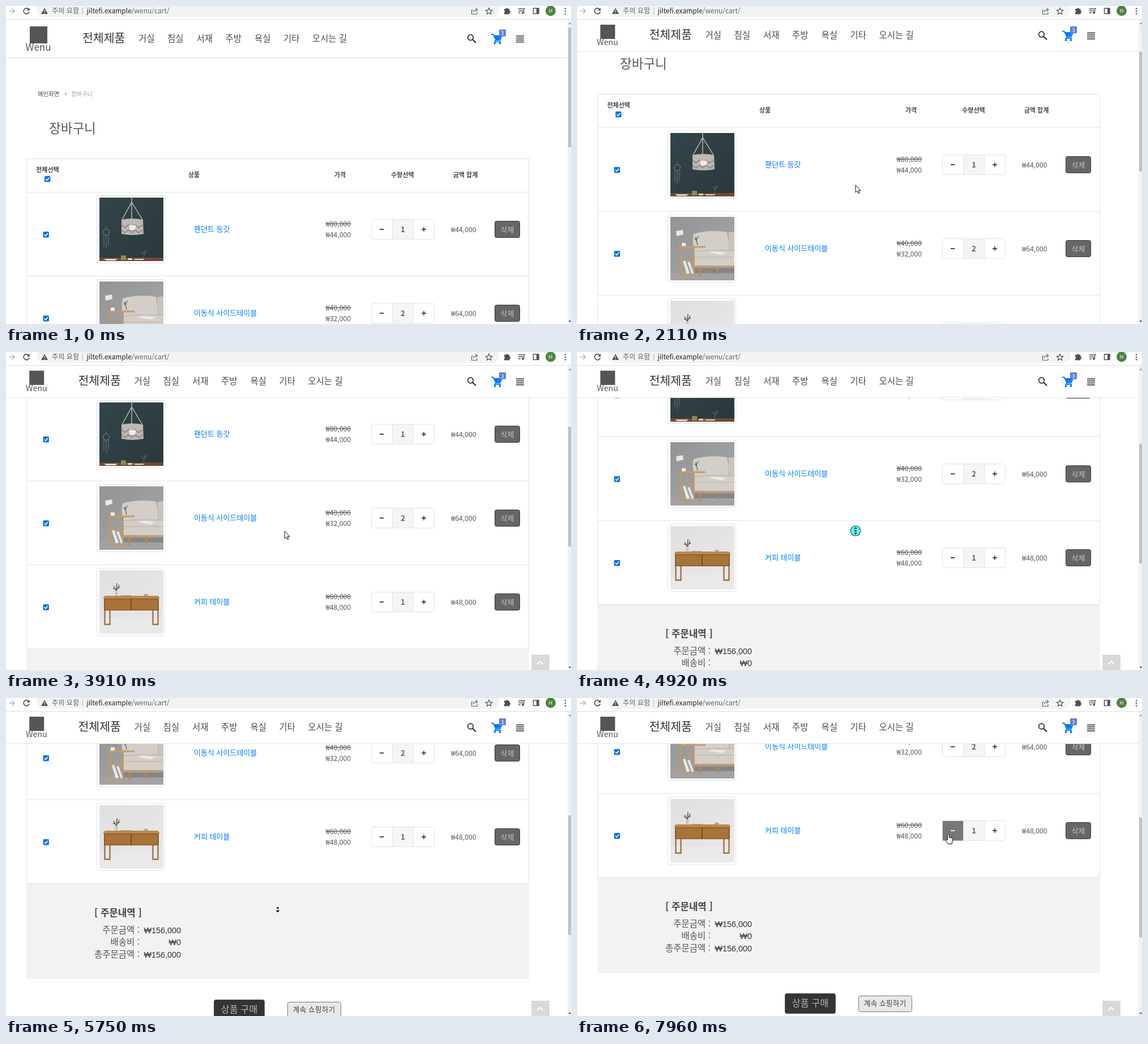
These frames come from a looping animation (998x561 px, 8 s). An HTML page:

```html
<!DOCTYPE html>
<html lang="ko">
<head>
<meta charset="utf-8">
<style>
  html, body { margin: 0; width: 100%; height: 100%; overflow: hidden; background: #fff; }
  svg { display: block; width: 998px; height: 561px; font-family: "Noto Sans CJK KR", "Noto Sans", sans-serif; }
  .arial { font-family: "Liberation Sans", "Noto Sans CJK KR", sans-serif; }
</style>
</head>
<body>
<svg id="stage" viewBox="0 0 998 561"></svg>
<script>
const LOOP = 8000;
const ROW_TOP = 328, ROW_HEIGHT = 148, ROW3_TOP = ROW_TOP + 2 * ROW_HEIGHT;
const TABLE_END = ROW_TOP + 3 * ROW_HEIGHT;

// Markup helpers; text is placed by its vertical centre.
const text = (x, y, size, str, fill = '#444', attrs = '') =>
  `<text x="${x}" y="${y + size * 0.37}" font-size="${size}" fill="${fill}" ${attrs}>${str}</text>`;
const rect = (x, y, w, h, fill, attrs = '') =>
  `<rect x="${x}" y="${y}" width="${w}" height="${h}" fill="${fill}" ${attrs}/>`;
const line = (d, stroke, width = 1, attrs = '') =>
  `<path d="${d}" fill="none" stroke="${stroke}" stroke-width="${width}" ${attrs}/>`;
const shape = (d, fill, attrs = '') => `<path d="${d}" fill="${fill}" ${attrs}/>`;
const circle = (x, y, r, fill, attrs = '') => `<circle cx="${x}" cy="${y}" r="${r}" fill="${fill}" ${attrs}/>`;
const group = (id, content, attrs = '') => `<g id="${id}" ${attrs}>${content}</g>`;
const MID = 'text-anchor="middle"', END = 'text-anchor="end"', BOLD = 'font-weight="700"';
const won = n => '₩' + n.toLocaleString('en-US');

const checkbox = (x, y) =>
  rect(x - 5, y - 5, 10.5, 10.5, '#0b74e5', 'rx="1.8"') + line(`M${x - 2.6} ${y + .3}l2.1 2.2 3.9-4.6`, '#fff', 1.6);

// Product pictures, 113 x 112 each.
const lampPhoto =
  rect(0, 0, 113, 112, 'url(#tealWall)') +
  line('M57 0V12M57 8L40 39M57 8L76 39M57 12V38', '#c9c6c0', 1.3) +
  shape('M39 39Q58 35 77 39L78 64Q58 68 39 64Z', '#bdb8b4') +
  line('M39 48l6 5 6-5 6 5 6-5 6 5 8-5M39 57l6 5 6-5 6 5 6-5 6 5 8-5', '#8e8a88', 2) +
  shape('M52 49h13l-2 8H54z', '#efece8') +
  circle(12, 61, 5.5, 'none', 'stroke="#7f8987"') +
  line('M12 55V50M8 66V86M12 67V90M16 66V84', '#6f7976', 1) +
  line('M78 106l3-14M80 101l-6-6M80 98l5-4', '#526b48', 1.2) +
  rect(0, 106, 113, 6, '#714a31') +
  shape('M8 108h24l-4 3H12zM60 108h20l-3 2H63z', '#dcd8d0') +
  rect(38, 102, 9, 8, '#8b8a5c') + rect(50, 107, 8, 3, '#ddd6c6');

const sofaPhoto =
  rect(0, 0, 113, 112, 'url(#greyWall)') + rect(0, 98, 113, 14, '#a2a2a3') +
  shape('M10 25l12-2 1 8-12 3z', '#e7e7e7') +
  rect(42, 89, 71, 10, '#858586') +
  shape('M41 30Q70 22 100 27Q104 44 103 61H42Q38 44 41 30Z', '#d3cec8') +
  shape('M102 28Q108 25 113 27V61H104Z', '#c9c3bc') +
  shape('M42 61Q78 57 113 60V86H42Z', '#d4cec6') + line('M42 61Q78 57 113 60M42 71H113', '#b5aea5') +
  line('M43 89H113', '#c19a6e', 3) + line('M53 90V105M83 90V102', '#b98a58', 3) +
  line('M48 50l-3-15M47 43l-4-5M46 40l4-6', '#66645d', 1.3) +
  rect(20, 46, 7, 7, '#f0eeea') + shape('M67 63l10-2 22 2-8 4z', '#eeeae4') +
  line('M15 53H62', '#c89b68', 3) + line('M18.500 54V104M41.500 54V103M18 75H43M18 103H44', '#c29867', 2.6) +
  shape('M22 78l4-1 8 22-5 2zM30 80l4-1 7 20-3 2z', '#ebe8e3');

const tablePhoto =
  rect(0, 0, 113, 112, 'url(#paleWall)') + rect(0, 84, 113, 28, '#e9e9ea') +
  line('M30 46V32M30 37l-5-9M30 36l5-10M30 33l1-10M28 33l-4-1M32 32l4-2', '#6c5b49', 1.5) +
  rect(27, 36, 6, 9, '#cfd1d0', 'opacity=".8"') +
  shape('M38 44h18v2H38zM78 42h8l-1 3h-6z', '#b5a593') +
  shape('M10 45H103L106 48V50H7V48z', '#b98a4e') + rect(8, 50, 97, 21, '#8d5c28') +
  rect(10, 51.500, 45, 18, '#a87338') + rect(57, 51.500, 46, 18, '#a87338') +
  line('M56 50V71', '#6d431d', 1.2) +
  line('M9.500 71V95.500H18.500V71M94.500 71V95.500H103.500V71', '#a0713e', 2.4);

const products = [
  { name: '팬던트 등갓', was: 80000, price: 44000, count: 1, photo: lampPhoto },
  { name: '이동식 사이드테이블', was: 40000, price: 32000, count: 2, photo: sofaPhoto },
  { name: '커피 테이블', was: 60000, price: 48000, count: 1, photo: tablePhoto },
];

const productRow = (p, i) => group('row' + i,
  line('M36.5 .5H923.5', '#dfe2e5') + checkbox(70.5, 75) +
  rect(160.5, 6.5, 120, 119, '#fff', 'rx="3" stroke="#dee2e6"') +
  `<svg x="165" y="10" width="113" height="112">${p.photo}</svg>` +
  text(332, 65.5, 13, p.name, '#007bff') +
  text(587, 56.3, 12.3, won(p.was), '#555', MID + ' text-decoration="line-through"') +
  text(587, 75.7, 12.3, won(p.price), '#555', MID) +
  rect(645.5, 48.5, 111, 35, '#fff', 'rx="3" stroke="#dfe2e5"') +
  rect(682.5, 48.5, 37, 35, '#f5f5f5', 'stroke="#e1e3e6"') +
  rect(646, 49, 36, 34.5, '#777', 'class="minusHover" opacity="0"') +
  rect(720, 49, 36.5, 34.5, '#777', 'class="plusHover" opacity="0"') +
  line('M660 66H667.5', '#222', 1.6, 'class="minus"') + line('M734 66H742M738 62V70', '#222', 1.4, 'class="plus"') +
  text(701, 66.3, 13.5, p.count, '#666', `${MID} ${BOLD} class="count"`) +
  text(808.5, 66, 12.3, won(p.price * p.count), '#555', MID + ' class="total"') +
  rect(863.5, 51.5, 44, 29, '#666', 'rx="3" stroke="#343a40"') + text(885.5, 65.7, 13, '삭제', '#c4c4c4', MID),
  `transform="translate(0 ${ROW_TOP + i * ROW_HEIGHT})"`);

const tableHead =
  rect(36.5, 269.5, 887, TABLE_END - 269, '#fff', 'stroke="#dfe2e5"') +
  [[73.5, 289, '전체선택'], [332, 298, '상품'], [590, 298, '가격'], [700.5, 298, '수량선택'], [811.5, 298, '금액 합계']]
    .map(([x, y, label]) => text(x, y, 11, label, '#444', `${MID} ${BOLD}`)).join('') +
  checkbox(73, 305);

const sumLine = (y, label, cls) =>
  text(236, y, 15.5, label + ' :', '#555', END) +
  text(309, y + .5, 14.4, '₩0', '#333', `${END} class="arial ${cls}"`);

const summary =
  rect(36, TABLE_END, 888, 169, '#f2f2f2') +
  line(`M36 ${TABLE_END + .5}H924`, '#dfe2e5') +
  text(156, 823.3, 16.8, '[ 주문내역 ]', '#444', BOLD) +
  sumLine(854, '주문금액', 'sum') + sumLine(875.5, '배송비', 'fee') + sumLine(897, '총주문금액', 'sum') +
  rect(367.5, 977.5, 89, 35, '#343434', 'rx="3" stroke="#4a554e"') + text(412, 994, 16.3, '상품 구매', '#b5b5b5', MID) +
  rect(497.5, 981.5, 94, 28, '#e8e8e8', 'rx="3" stroke="#777"') + text(544, 994, 12.9, '계속 쇼핑하기', '#444', MID);

const page =
  text(56, 155, 10.3, '메인화면', '#444') + line('M104 153l2.2 2.2-2.2 2.2', '#555') +
  text(115, 155, 10.3, '장바구니', '#999') +
  text(76, 215.5, 22.5, '장바구니', '#555') +
  tableHead + products.map(productRow).join('') + summary;

const navItems = [[234, '거실'], [285, '침실'], [336.5, '서재'], [387.5, '주방'], [439, '욕실'], [490, '기타'], [541, '오시는 길']];
const header =
  rect(0, 20, 992, 72, '#fff', 'id="headerBox"') + line('M0 0H992', '#e4e4e4', 1, 'id="headerLine"') +
  group('logo', rect(42, 36, 31, 30, '#555') + text(57, 73, 17, 'Wenu', '#555', MID)) +
  group('nav', text(135, 56, 20.5, '전체제품', '#333') +
    navItems.map(([x, label]) => text(x, 57, 15.5, label, '#4a4a4a')).join('')) +
  group('icons',
    circle(820.5, 55.5, 4.8, 'none', 'stroke="#222" stroke-width="1.7"') + line('M824 59l6 6', '#222', 2) +
    line('M857 50H860.5L865.5 60H872.5L876 52.5', '#007bff', 1.9) + shape('M861.5 51.5H875L872 59H865z', '#007bff') +
    line('M865 60l-1.5 2.7H874.5', '#007bff', 1.8) + circle(863.5, 65.5, 1.9, '#007bff') + circle(872.5, 65.5, 1.9, '#007bff') +
    rect(871, 41.5, 12, 12, '#5f7fd9') + text(877, 47.5, 9.5, '3', '#fff', MID) +
    line('M901 53H915M901 56.5H915M901 60H915M901 63.5H915', '#222', 1.7));

const browserBar =
  rect(0, 0, 998, 24, '#fff') + rect(54, -8, 818, 27.5, '#f1f3f4', 'rx="13.5"') + line('M0 23.5H998', '#dcdee0') +
  line('M5 9H15M10.5 4.5L15 9l-4.5 4.5', '#b5b8bb', 1.5) +
  line('M40.2 6A5 5 0 1 0 41 10', '#4d5156', 1.7) + shape('M41.8 3V8H36.8z', '#4d5156') +
  shape('M68 3.5L74 14H62z', '#4d5156') + line('M68 7V10.3M68 11.3V12.7', '#f1f3f4', 1.3) +
  text(81, 8.5, 12.2, '주의 요함', '#5f6368') + line('M135.5 3V15', '#b9bcc0') +
  text(142.5, 8.5, 12, 'jiltefi.example<tspan fill="#5f6368">/wenu/cart/</tspan>', '#222') +
  line('M825 7H822.5V14.5H832V11M825.5 11Q826 6.5 831.5 6.5M829.5 3.5l3.3 3-3.3 3', '#5f6368', 1.2) +
  line('M853 3.5l1.7 3.7 4 .4-3 2.7.9 4-3.6-2-3.6 2 .9-4-3-2.7 4-.4z', '#4d5156', 1.2) +
  shape('M880 5h3a1.8 1.8 0 0 1 3.6 0H889.5V8.5a1.8 1.8 0 0 1 0 3.6V14.5H880V11.5a1.8 1.8 0 0 0 0-3.4z', '#4d5156') +
  line('M905 5H913M905 8.5H913M905 12H909M914.5 12V4.5H917', '#4d5156', 1.5) + circle(913, 12, 1.9, '#4d5156') +
  rect(931.5, 4, 9.5, 9.5, 'none', 'stroke="#4d5156" stroke-width="1.5"') + rect(937, 4, 4, 9.5, '#4d5156') +
  circle(962, 8.5, 9, '#4f8240') + text(962, 8.5, 9.5, 'H', '#fff', MID) +
  [4.5, 9, 13.5].map(y => circle(988, y, 1.3, '#4d5156')).join('');

const scrollbar =
  rect(992, 24, 6, 537, '#f1f1f1') + rect(993, 38, 5, 211, '#c1c1c1', 'id="thumb"') +
  shape('M993.5 32L996 29l2 3z', '#888') + shape('M993.5 555L996 558l2-3z', '#444');

const pointers =
  group('arrow', shape('M0 0V13l3-2.7 2.2 4.7 2-1-2.1-4.4h4z', '#fff', 'stroke="#111"')) +
  group('hand', shape('M-1.5 1Q0-1 1.5 1V6l5 1.2Q8 8 7.5 11L6 17.5H-1L-5 11Q-4 8.5-1.5 10.5Z', '#fff', 'stroke="#111"')) +
  group('pan', circle(0, 0, 8.8, '#5ff0ee', 'stroke="#0c6f74" stroke-width="1.2"') +
    circle(0, 0, 1.7, '#123') + shape('M-3-3.5H3L0-6.5zM-3 3.5H3L0 6.5z', '#123')) +
  group('panDown', circle(0, -3.5, 1.8, '#111') + shape('M-3.5 .5H3.5L0 4.5z', '#111'));

const gradient = (id, from, to) =>
  `<linearGradient id="${id}" x2="1" y2="1"><stop stop-color="${from}"/><stop offset="1" stop-color="${to}"/></linearGradient>`;

document.getElementById('stage').innerHTML =
  `<defs>${gradient('tealWall', '#334549', '#2a383c')}${gradient('greyWall', '#929395', '#a9a9aa')}${gradient('paleWall', '#e0e0e2', '#e8e8e9')}</defs>` +
  group('page', page) +
  group('toTop', rect(928, 534, 32, 27, '#d9d9d9') + line('M938.5 551l5-5 5 5', '#fff', 2)) +
  header + scrollbar + browserBar + pointers;

const $ = id => document.getElementById(id);
const set = (node, name, value) => node.setAttribute(name, value);
const all = (selector, fn) => document.querySelectorAll(selector).forEach(fn);
const linear = k => k;
const smooth = k => k * k * (3 - 2 * k);

// Interpolates [time, ...values] keys.
function track(keys, t, ease = linear) {
  const next = keys.findIndex(key => key[0] > t);
  if (next < 0) return keys.at(-1).slice(1);
  if (next === 0) return keys[0].slice(1);
  const a = keys[next - 1], b = keys[next];
  const k = ease((t - a[0]) / (b[0] - a[0]));
  return a.slice(1).map((v, i) => v + (b[i + 1] - v) * k);
}

const scrollKeys = [[1450, 0], [1760, 114], [2460, 114], [2720, 221], [3860, 221], [4050, 327],
  [5050, 327], [5200, 339], [5470, 402], [5820, 456]];
const headerKeys = [[1640, 0], [2050, 1]];
const toTopKeys = [[2500, 0], [2720, 1]];
const cursorKeys = [[460, 824, 503], [890, 497, 311], [1000, 497, 311], [1130, 488, 302], [1300, 492, 316],
  [4900, 492, 316], [4920, 492, 315.5], [5050, 492, 315.5], [5470, 480, 374], [5820, 480, 374],
  [6580, 746, 234], [7150, 746, 234], [7820, 656, 240]];
const PAN_START = 4920, PAN_MOVE = 5050, PAN_END = 5820, ADD_CLICK = 6800, REMOVE_CLICK = 7950;

function draw(t) {
  const scroll = Math.round(track(scrollKeys, t)[0]);
  const [shrink] = track(headerKeys, t, smooth);
  const [x, y] = track(cursorKeys, t, smooth);

  set($('page'), 'transform', `translate(0 ${-scroll})`);
  set($('thumb'), 'y', Math.round(37.5 + scroll * 0.38));
  set($('toTop'), 'opacity', track(toTopKeys, t)[0]);

  set($('headerBox'), 'height', 72 - 12 * shrink);
  set($('headerLine'), 'transform', `translate(0 ${91.5 - 11 * shrink})`);
  set($('logo'), 'transform', `translate(37 17) scale(${1 - 0.16 * shrink}) translate(-37 -17)`);
  set($('nav'), 'transform', `translate(${-7.5 * shrink} ${-5.5 * shrink})`);
  set($('icons'), 'transform', `translate(0 ${-5.5 * shrink})`);

  const rowY = y - (ROW3_TOP - scroll);
  const inButtons = t > PAN_END && rowY > 49 && rowY < 84;
  const overMinus = inButtons && x > 646 && x < 682;
  const overPlus = inButtons && x > 720 && x < 757;
  const row = $('row2');
  for (const [name, over] of [['minus', overMinus], ['plus', overPlus]]) {
    set(row.querySelector(`.${name}Hover`), 'opacity', +over);
    set(row.querySelector(`.${name}`), 'stroke', over ? '#fff' : '#222');
  }

  const count = t >= ADD_CLICK && t < REMOVE_CLICK ? 2 : 1;
  row.querySelector('.count').textContent = count;
  row.querySelector('.total').textContent = won(48000 * count);
  all('.sum', node => node.textContent = won(108000 + 48000 * count));

  const pointer = t < 460 ? '' : t >= PAN_START && t < PAN_MOVE ? 'pan'
    : t >= PAN_MOVE && t < PAN_END ? 'panDown' : overMinus || overPlus ? 'hand' : 'arrow';
  for (const id of ['arrow', 'hand', 'pan', 'panDown']) {
    set($(id), 'display', id === pointer ? 'inline' : 'none');
    set($(id), 'transform', `translate(${x} ${y})`);
  }
}

function tick() {
  draw(performance.now() % LOOP);
  requestAnimationFrame(tick);
}
tick();
</script>
</body>
</html>
```
